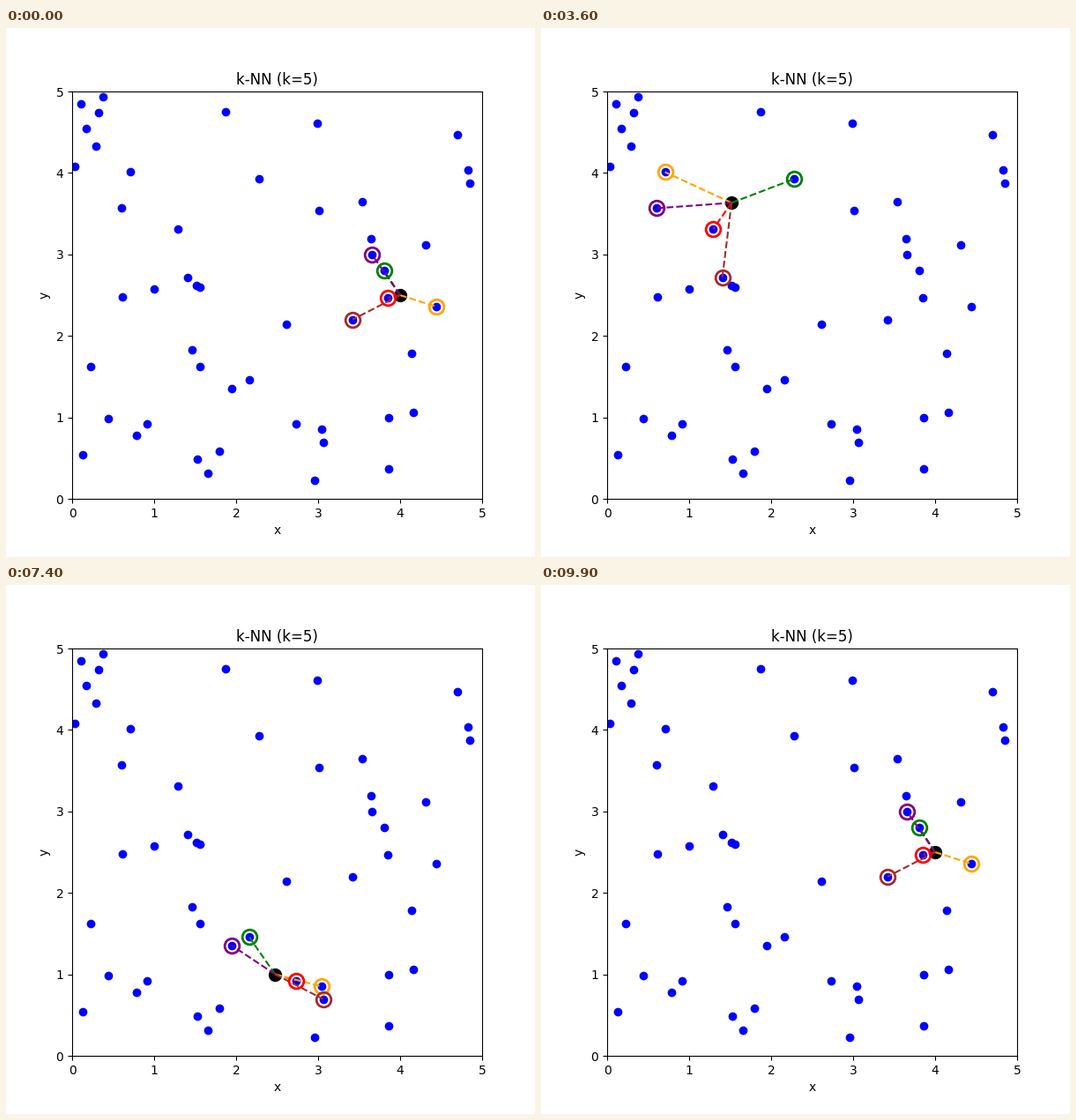
Write a matplotlib script that moves like this. It is 600 px wide and 600 px high and loops after 10 s.

```python
import numpy as np
import matplotlib.pyplot as plt
from matplotlib.animation import FuncAnimation

K = 5
FRAMES = 100
COLORS = ["red", "green", "orange", "purple", "brown"]

np.random.seed(42)
points = np.random.rand(50, 2) * 5

# The query point walks once around a circle
theta = np.linspace(0, 2 * np.pi, FRAMES)
path = 2.5 + 1.5 * np.column_stack([np.cos(theta), np.sin(theta)])

fig, ax = plt.subplots(figsize=(6, 6), dpi=100)
ax.set_xlim(0, 5)
ax.set_ylim(0, 5)
ax.set_xlabel("x")
ax.set_ylabel("y")
ax.set_title(f"k-NN (k={K})")

ax.plot(points[:, 0], points[:, 1], "bo", markersize=6)
query, = ax.plot([], [], "ko", markersize=10)
links = [ax.plot([], [], "--", color=c, lw=1.5)[0] for c in COLORS]
rings = [ax.plot([], [], "o", color=c, markersize=12,
                 markerfacecolor="none", markeredgewidth=2)[0]
         for c in COLORS]


def update(frame):
    q = path[frame]
    query.set_data([q[0]], [q[1]])
    dist = np.linalg.norm(points - q, axis=1)
    nearest = points[np.argsort(dist)[:K]]
    for p, link, ring in zip(nearest, links, rings):
        link.set_data([q[0], p[0]], [q[1], p[1]])
        ring.set_data([p[0]], [p[1]])
    return [query, *links, *rings]


anim = FuncAnimation(fig, update, frames=FRAMES, interval=100,
                     repeat=True, repeat_delay=0)
plt.show()
```
